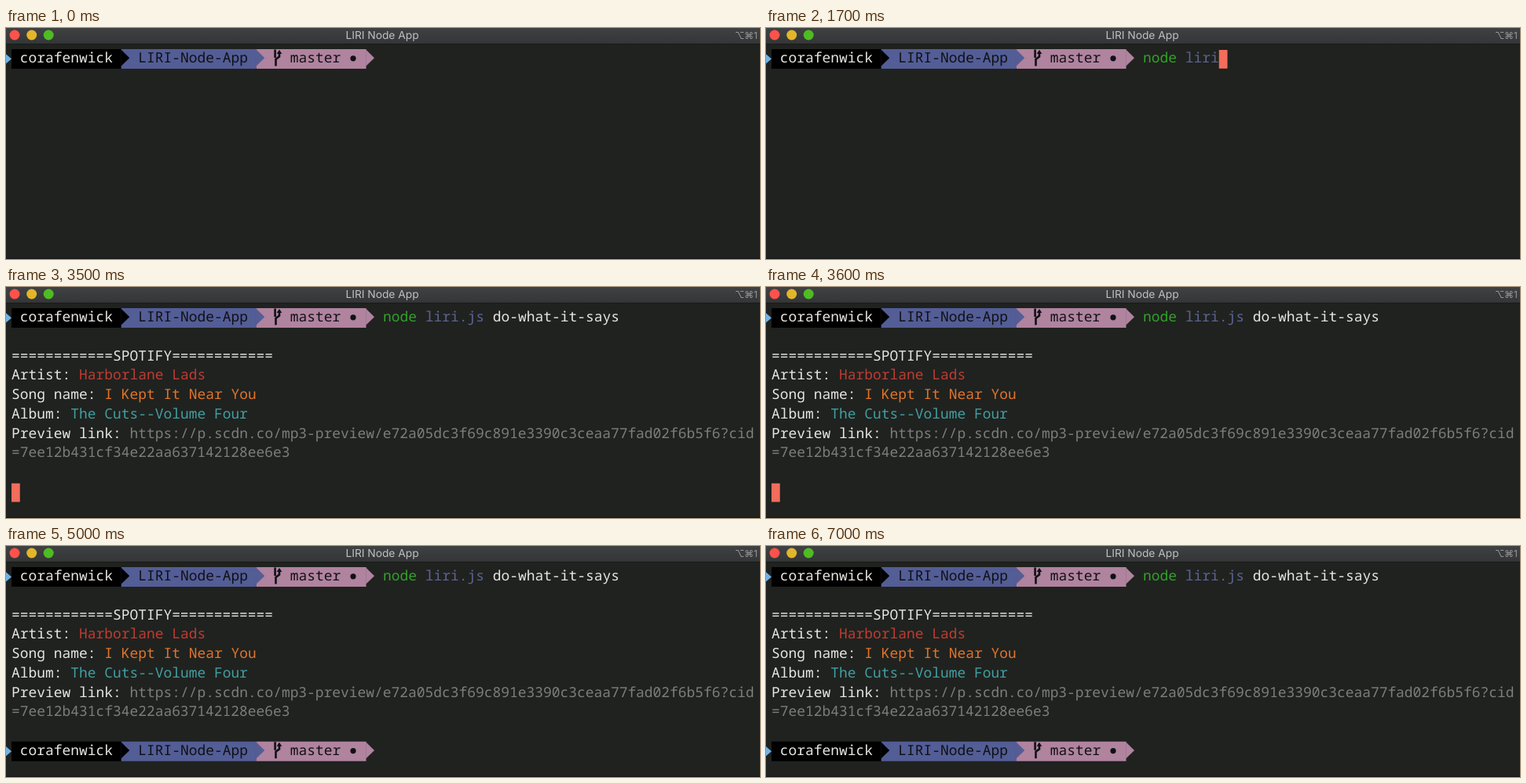
An HTML page for the animation above (7100 ms loop, 960 by 295 pixels).

```html
<!DOCTYPE html>
<html lang="en">
<head>
<meta charset="utf-8">
<title>Terminal session</title>
<style>
  html, body { margin: 0; width: 100%; height: 100%; overflow: hidden; background: #20221f; }
  svg { display: block; width: 960px; height: 295px; }
  .mono { font: 17.917px "Noto Sans Mono", "DejaVu Sans Mono", monospace; font-variant-ligatures: none; text-rendering: geometricPrecision; white-space: pre; }
  .title { font: 13.75px Inter, "Open Sans", sans-serif; fill: #bfc0c1; text-rendering: geometricPrecision; }
  .keys { font: 12px Inter, "DejaVu Sans", sans-serif; fill: #98999a; }
</style>
</head>
<body>
<svg viewBox="0 0 960 295">
  <defs>
    <linearGradient id="bar" x2="0" y2="1">
      <stop stop-color="#404143"/>
      <stop offset="1" stop-color="#343537"/>
    </linearGradient>
  </defs>
  <rect width="960" height="295" fill="#20221f"/>
  <rect y="294" width="960" height="1" fill="#121312"/>
  <rect width="960" height="20" fill="url(#bar)"/>
  <rect y="20" width="960" height="1" fill="#191a19"/>
  <circle cx="11" cy="9" r="6.5" fill="#fc524c"/>
  <circle cx="32.7" cy="9" r="6.5" fill="#e2b52b"/>
  <circle cx="54.2" cy="9" r="6.5" fill="#4ebc23"/>
  <text class="title" x="479" y="14" text-anchor="middle">LIRI Node App</text>
  <text class="keys" x="928 940 952" y="13.5">⌥⌘1</text>
  <g id="screen" class="mono"></g>
</svg>
<script>
const LOOP = 7100, CELL = 10.75, ROW = 24.75, LEFT = 7, TOP = 27;
const COLOR = {
  white: '#e6e6e3', ink: '#101114', black: '#000', blue: '#535d96', pink: '#b0839f',
  sky: '#6fb3e8', green: '#31a329', path: '#5b6393', red: '#bf3c33', orange: '#e2742b',
  teal: '#419fa2', grey: '#7c7e7b', cursor: '#f26d5b'
};
const COMMAND = [['node', 'green', 44], ['liri.js', 'path', 49], ['do-what-it-says', 'white', 57]];

const screen = document.getElementById('screen');
const colX = col => LEFT + col * CELL;
const rowY = row => TOP + row * ROW;

function add(parent, name, attrs, content) {
  const node = document.createElementNS('http://www.w3.org/2000/svg', name);
  for (const key in attrs) node.setAttribute(key, attrs[key]);
  if (content) node.textContent = content;
  return parent.appendChild(node);
}
const group = () => add(screen, 'g', {});
const shape = (parent, d, color) => add(parent, 'path', { d, fill: COLOR[color] });
const write = (parent, row, col, content, color) =>
  add(parent, 'text', { x: colX(col), y: rowY(row) + 17.2, fill: COLOR[color] }, content);

function segment(parent, from, to, color) {
  shape(parent, `M${colX(from)} 27H${colX(to)}V52H${colX(from)}z`, color);
}
const arrow = (parent, col, color) =>
  shape(parent, `M${colX(col) - .3} 27.6l10.8 10.6l-10.8 10.6z`, color);

function drawPrompt(row) {
  const g = group();
  g.setAttribute('transform', `translate(0 ${row * ROW})`);
  shape(g, 'M0 33.3L7 39.4L0 45.5z', 'sky');
  segment(g, 0, 13, 'black');
  segment(g, 13, 29, 'blue');
  segment(g, 29, 42, 'pink');
  arrow(g, 13, 'black');
  arrow(g, 29, 'blue');
  arrow(g, 42, 'pink');
  write(g, 0, 1, 'corafenwick', 'white');
  write(g, 0, 15, 'LIRI-Node-App', 'ink');
  add(g, 'path', { d: 'M342.6 27.5v10.5M343.5 48.5v-8.5l4.5-3.5v-5', fill: 'none', stroke: COLOR.ink, 'stroke-width': 2.6 });
  shape(g, 'M344.6 33l3.4-5l3.4 5z', 'ink');
  write(g, 0, 33, 'master', 'ink');
  add(g, 'circle', { cx: 442, cy: 38.8, r: 3.6, fill: COLOR.ink });
  return g;
}

function drawOutput() {
  const g = group();
  const rule = '='.repeat(12);
  write(g, 2, 0, rule + 'SPOTIFY' + rule, 'white');
  [
    ['Artist: ', 'Harborlane Lads', 'red'],
    ['Song name: ', 'I Kept It Near You', 'orange'],
    ['Album: ', 'The Cuts--Volume Four', 'teal'],
    ['Preview link: ', 'https://p.scdn.co/mp3-preview/e72a05dc3f69c891e3390c3ceaa77fad02f6b5f6?cid', 'grey']
  ].forEach(([label, value, color], i) => {
    write(g, 3 + i, 0, label, 'white');
    write(g, 3 + i, label.length, value, color);
  });
  write(g, 7, 0, '=7ee12b431cf34e22aa637142128ee6e3', 'grey');
  return g;
}

drawPrompt(0);
const typed = COMMAND.map(([, color, col]) => write(screen, 0, col, '', color));
const output = drawOutput();
const nextPrompt = drawPrompt(9);
const cursor = add(screen, 'rect', { width: CELL, height: ROW - 1, fill: COLOR.cursor });

// [time, cursor row, cursor column, cursor visible]
const CURSOR = [
  [0, 0, 44, false], [200, 0, 44, true], [700, 0, 44, false], [1200, 0, 44, true],
  [2900, 1, 0, true], [3500, 9, 0, true], [3700, 9, 44, true],
  [4900, 9, 44, false], [5400, 9, 44, true], [6000, 9, 44, false],
  [6500, 9, 44, true], [7000, 9, 44, false]
];

function typedCount(t) {
  if (t < 1500) return 0;
  if (t >= 2400) return 28;
  return Math.min(25, Math.round((Math.floor((t - 1500) / 100) + 1) * 25 / 8));
}
const show = (node, on) => node.setAttribute('visibility', on ? 'visible' : 'hidden');

function render(t) {
  const count = typedCount(t);
  COMMAND.forEach(([word, , col], i) => {
    typed[i].textContent = word.slice(0, Math.max(0, 44 + count - col));
  });
  show(output, t >= 3500);
  show(nextPrompt, t >= 3700);
  const [, row, col, on] = CURSOR.findLast(step => step[0] <= t);
  cursor.setAttribute('x', colX(col + (row === 0 ? count : 0)));
  cursor.setAttribute('y', rowY(row) + 1);
  show(cursor, on);
}

const start = performance.now();
function tick() {
  render((performance.now() - start) % LOOP);
  requestAnimationFrame(tick);
}
tick();
</script>
</body>
</html>
```
